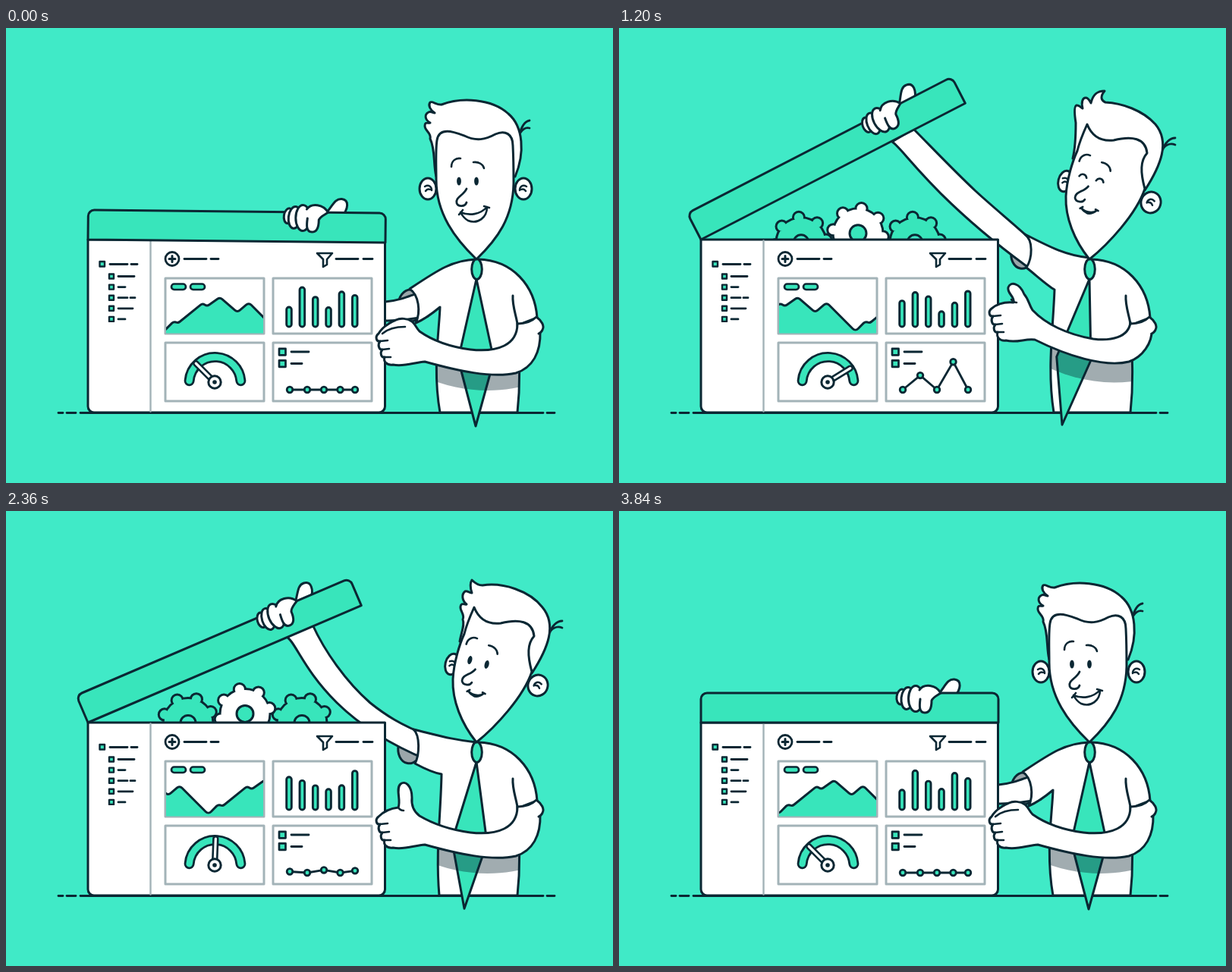
Recreate the animation shown at these times as an HTML page with a canvas. Size 800x600 px, loop 3880 ms.

```html
<!DOCTYPE html>
<html lang="en">
<head>
<meta charset="utf-8">
<title>Dashboard with a lid</title>
<style>
html, body { margin: 0; width: 100%; height: 100%; overflow: hidden; background: #40eac7; }
canvas { display: block; }
</style>
</head>
<body>
<canvas id="stage" width="800" height="600"></canvas>
<script>
const ctx = document.getElementById('stage').getContext('2d');
const LOOP = 3880, TAU = Math.PI * 2;
const BG = '#40eac7', TEAL = '#38e5bb', INK = '#0b2733', WHITE = '#fff', GREY = '#a3b3b8';

// ---------- helpers ----------
const clamp = (v, lo = 0, hi = 1) => Math.min(hi, Math.max(lo, v));
const lerp = (a, b, k) => a + (b - a) * k;
const smooth = x => { x = clamp(x); return x * x * (3 - 2 * x); };
const NUM = /-?\d+(\.\d+)?/g;

// Blend two path strings that share the same commands.
function mix(a, b, k) {
  const to = b.match(NUM);
  let i = 0;
  return a.replace(NUM, n => lerp(+n, +to[i++], k).toFixed(3));
}

// Eased value from a flat list: time, value, time, value...
function track(t, ...keys) {
  if (t <= keys[0]) return keys[1];
  for (let i = 2; i < keys.length; i += 2) {
    if (t <= keys[i]) return lerp(keys[i - 1], keys[i + 1], smooth((t - keys[i - 2]) / (keys[i] - keys[i - 2])));
  }
  return keys[keys.length - 1];
}

// Path for a value between keyed poses.
function pose(keys, v) {
  let i = 0;
  while (i < keys.length - 2 && v > keys[i + 1][0]) i++;
  const [[from, a], [to, b]] = [keys[i], keys[i + 1]];
  return mix(a, b, clamp((v - from) / (to - from)));
}

function paint(path, fill, line = 3, color = INK) {
  if (fill) { ctx.fillStyle = fill; ctx.fill(path); }
  if (line) { ctx.lineWidth = line; ctx.strokeStyle = color; ctx.stroke(path); }
}
const draw = (d, ...style) => paint(new Path2D(d), ...style);
function oval(x, y, rx, ry, fill, line, turn = 0) {
  const p = new Path2D();
  p.ellipse(x, y, rx, ry, turn, 0, TAU);
  paint(p, fill, line);
}
function box(x, y, w, h, r, ...style) {
  const p = new Path2D();
  p.roundRect(x, y, w, h, r);
  paint(p, ...style);
}
const dashes = (y, ...xs) => {
  for (let i = 0; i < xs.length; i += 2) draw(`M${xs[i]} ${y}H${xs[i + 1]}`, null, 2.8);
};
function group(x, y, turn, body) {
  ctx.save();
  ctx.translate(x, y);
  ctx.rotate(turn);
  body();
  ctx.restore();
}

// ---------- poses ----------
const ARM = [ // keyed by lid angle
  [0, 'M415 262 C425 380 460 398 556 380 L556 345 C525 356 515 360 500 361 C465 360 452 320 445 262Z'],
  [1.6, 'M425 262 C430 370 460 382 556 373 L556 345 C535 342 515 343 500 343 C470 340 456 320 449 262Z'],
  [21.1, 'M376 176 C396 182 406 267 555 328 L556 296 C520 282 500 270 480 254 C455 230 426 200 411 163Z'],
  [23.2, 'M368 165 C388 172 402 265 555 328 L556 296 C520 282 500 269 480 253 C448 225 420 185 404 150Z'],
  [27.3, 'M360 150 C376 160 415 227 552 325 L555 290 C520 258 495 238 470 215 C440 187 410 155 388 133Z']
];
const SIDE = ' L674 507 C678 470 677 440 674 392 L700 382 C697 340 668 306 622 305Z';
const TORSO = [
  [0, 'M620 305 C588 306 568 320 532 344 C544 352 547 374 540 389 C552 384 560 378 572 368 C571 400 562 450 572 507' + SIDE],
  [1.6, 'M620 305 C590 304 570 312 531 335 C544 342 547 364 540 380 C552 378 562 372 572 362 C571 400 562 450 572 507' + SIDE],
  [23.2, 'M620 305 C590 302 570 296 537 288 C546 296 545 322 539 333 C552 340 562 345 574 347 C573 400 566 450 571 507' + SIDE],
  [27.3, 'M620 303 C590 300 570 290 535 272 C546 280 545 303 537 316 C552 328 565 340 574 345 C572 400 564 450 573 507' + SIDE]
];

const FINGERS = ' C486 407 488 414 493 413 C489 418 492 425 496 424 C492 429 495 435 499 434 C497 440 502 445 510 444 C525 447 538 441 552 440 C595 452 640 462 672 455 C694 448 705 428 704 400';
const FIST = 'M674 390 C674 418 648 428 612 424 C582 420 562 412 545 400 C541 396 539 390 535 387 C529 383 520 382 514 385 C508 387 506 389 503 391 C498 394 494 398 491 403' + FINGERS;
const THUMB_UP = 'M674 390 C674 418 648 428 612 424 C582 420 562 412 545 402 C537 396 534 388 535 378 C535 362 526 355 520 360 C513 366 521 382 517 391 C508 392 498 396 491 403' + FINGERS;
const RAISED = 'M674 388 C672 408 648 413 625 410 C590 404 562 390 545 372 C540 364 540 358 534 351 C528 336 516 334 513 342 C511 350 522 354 520 362 C508 361 498 364 491 370 C486 374 488 381 493 380 C489 385 492 392 496 391 C492 396 495 402 499 401 C497 408 502 413 510 412 C525 416 535 409 548 411 C590 432 640 448 672 440 C690 434 703 415 702 398';
const CREASE = 'M496 403C504 396 513 394 526 394';
const CREASE_UP = 'M517 391C519 394 521 395 524 395';

const HAIR_FRONT = 'M567 196 C563 180 566 160 559 146 C561 138 552 136 552 129 C552 123 556 126 559 125 C552 121 551 114 557 111 C560 109 562 112 565 112 C559 108 556 102 559 98 C562 96 568 102 574 101 C600 91 640 93 662 113 C682 130 684 165 671 196 L655 190Z';
const HAIR_TURN = 'M598 172 C600 160 605 150 602 143 C605 136 598 132 599 126 C600 120 604 124 607 123 C601 118 600 110 605 106 C608 105 611 108 614 108 C612 102 611 96 614 91 C617 94 621 98 628 98 C655 94 690 105 707 127 C726 150 715 180 693 214 L675 195Z';
const HAIR_FLICK = 'M598 172 C601 160 602 140 602 125 C600 112 600 103 603 102 C607 101 608 105 611 106 C609 98 611 92 615 92 C619 92 620 96 622 99 C624 90 628 83 640 83 C635 89 634 95 641 98 C662 99 690 108 707 127 C726 150 715 180 693 214 L675 195Z';
const FACE_FRONT = 'M567 200 C567 180 566 160 568 148 C571 130 590 137 604 142 C620 150 632 147 645 140 C658 134 668 140 668 155 C669 175 669 190 669 205 C668 250 648 278 620 305 C592 278 567 245 567 200Z';
const FACE_TURN = 'M589 222 C590 200 598 175 604 162 C607 150 612 138 617 127 C623 142 634 150 652 148 C676 142 694 145 696 165 C687 175 687 190 693 212 C682 245 645 285 620 305 C600 280 588 250 589 222Z';
const TUFT_FRONT = 'M677 140 C679 130 684 123 690 122 M678 138 C682 132 686 131 690 132';
const TUFT_TURN = 'M717 160 C719 152 726 145 733 145 M718 158 C722 153 728 152 733 154';
const SMILE = 'M599 243 C611 248 625 246 634 236 C634 250 622 259 609 254 C604 251 601 247 599 243 M597 246 L602 240 M630 235 L637 237';
const GRIN = 'M606 242 C610 246 621 246 626 240 C621 246 617 248 613 246 C609 245 607 244 606 242 M604 243 L607 240 M624 239 L628 240';

// ---------- dashboard ----------
const RIDGE = [[208, 400], [221, 387], [227, 389], [259, 363], [265, 367], [282, 355], [305, 375], [320, 362]];
const BARS = [[358, 9, 0], [348, 7, .5], [358.5, 7, .63], [365, 8, .2], [352, 11, .33], [346.5, 5, .97]]; // middle, swing, phase

function ridge(t) {
  const p = new Path2D(), shift = -150 * t / LOOP;
  p.moveTo(208 + shift - 5, 410);
  for (let n = 0; n < 3; n++) {
    RIDGE.forEach(([x, y], i) => {
      const [nx, ny] = RIDGE[i + 1] || [358, 400];
      p.arcTo(x + 150 * n + shift, y, nx + 150 * n + shift, ny, 5);
    });
  }
  p.lineTo(700, 410);
  ctx.save();
  ctx.beginPath();
  ctx.rect(211, 331, 128, 71.5);
  ctx.clip();
  paint(p, TEAL);
  ctx.restore();
}

function gauge(t) {
  const arc = new Path2D();
  arc.arc(275.5, 468, 34, Math.PI + .08, TAU - .08);
  paint(arc, null, 14);
  paint(arc, null, 8.4, TEAL);
  const swing = clamp(1.45 * Math.cos(TAU * (t / 1940 + .02)), -1, 1);
  group(275, 467, (8.5 - 53.5 * swing) * Math.PI / 180, () => {
    draw('M0 0V-35', null, 8.4);
    draw('M0 0V-35', null, 3.2, WHITE);
  });
  oval(275, 467, 8.2, 8.2, WHITE, 3);
  oval(275, 467, 2.8, 2.8, INK, 0);
}

function lineChart(t) {
  const half = t % 1940, odd = t >= 1940;
  const rise = half < 1250 ? smooth((half - 200) / 1050) : 1 - smooth((half - 1250) / 600);
  const pts = [13, 19, 31, 37, 23].map((h, i) =>
    [[374, 397, 419, 440.5, 460][i], 477 - ((i % 2 === 0) === odd ? h * rise : 0)]);
  draw('M' + pts.join('L'), null, 2.8);
  pts.forEach(([x, y]) => oval(x, y, 3.8, 3.8, TEAL, 2.8));
}

function dashboard(t) {
  box(108, 279, 391.5, 228, [0, 0, 8, 8], WHITE);
  draw('M190.5 280.5V505.5', null, 2.4, GREY);
  box(123.5, 308, 6.5, 6.5, 0, TEAL, 2.4);
  dashes(311.5, 137, 160, 165, 173);
  [[148, 169], [148, 157], [148, 160, 164, 170], [148, 167], [148, 157]].forEach((xs, i) => {
    const y = 327.5 + i * 14.1;
    box(136, y - 3, 6, 6, 0, TEAL, 2.4);
    dashes(y, ...xs);
  });
  oval(219, 304.5, 9, 9, WHITE, 2.8);
  draw('M215 304.5H223M219 300.5V308.5', null, 3);
  dashes(304.5, 235, 264, 270, 280, 435, 464, 471, 483);
  draw('M410 297H430L423 305V312L418 315V305Z', WHITE, 2.6);

  [[210, 330, 73], [352, 330, 73], [210, 415, 77], [352, 415, 77]].forEach(([x, y, h]) =>
    box(x, y, 130, h, 0, null, 3, GREY));
  ridge(t);
  box(218, 337.5, 19, 7.5, 3.7, TEAL, 2.7);
  box(243, 337.5, 19, 7.5, 3.7, TEAL, 2.7);
  BARS.forEach(([mid, swing, phase], i) => {
    const top = mid + swing * Math.cos(TAU * (t / 970 - phase));
    box(369.7 + i * 17.35, top + 1, 6.6, 393 - top, 3.3, TEAL, 2.9);
  });
  gauge(t);
  [427, 442.5].forEach((y, i) => {
    box(360, y - 4.2, 8.5, 8.5, 0, TEAL, 2.7);
    dashes(y, 376, 399 - 9 * i);
  });
  lineChart(t);
}

// ---------- lid, gears, hand ----------
function gear(x, y, turn, fill) {
  for (const [grow, color] of [[1.5, INK], [-1.5, fill]]) {
    ctx.fillStyle = color;
    ctx.beginPath();
    ctx.arc(x, y, 33 + grow, 0, TAU);
    for (let i = 0; i < 8; i++) {
      const a = turn + i * TAU / 8, bx = x + 33 * Math.cos(a), by = y + 33 * Math.sin(a);
      ctx.moveTo(bx, by);
      ctx.arc(bx, by, 7.6 + grow, 0, TAU);
    }
    ctx.fill();
  }
}
function gears(t, angle) {
  const rock = Math.cos(TAU * (t - 1150) / 1940);
  const y = 268.8 + 2 * rock + 46 * (1 - smooth(angle / 16));
  const turn = (-4 + 12 * rock - 90) * Math.PI / 180;
  for (const x of [240, 390]) {
    gear(x, y + 12, turn - .23, TEAL);
    oval(x, y + 12, 10, 10, BG);
  }
  gear(315, y, turn, WHITE);
  oval(315, y, 11, 11, TEAL);
}
function onLid(angle, body) {
  group(108, 279, -angle * Math.PI / 180, body);
}
function lid() {
  box(0, -39, 392, 39, [8, 8, 0, 0], TEAL);
  oval(264, -34, 6, 10, WHITE, 3, .15);
  oval(272, -32, 8, 14.5, WHITE, 3, .1);
  oval(283, -31.5, 9.5, 17, WHITE, 3);
  draw('M288 -43C294 -52 310 -50 316 -39C312 -36 306 -34 304 -29C304 -21 302 -13 295 -13C287 -13 288 -23 289 -31', WHITE);
}
const thumb = () => draw('M312 -36C322 -48 325 -58 334 -57C344 -56 343 -44 334 -34Z', WHITE);

// ---------- man ----------
function body(angle, raise, thumbUp, sway) {
  const torso = new Path2D(pose(TORSO, angle));
  paint(torso, WHITE);
  draw(`M620 331L${596 + .55 * sway} ${437 + .1 * sway}L${619 + sway} ${525 - .05 * Math.abs(sway)}L${643 + .6 * sway} 438Z`, TEAL);
  oval(620.5, 318, 6.8, 13.5, TEAL, 3);

  ctx.save();
  ctx.clip(torso);
  group(567, 447 - 19 * raise, .11 * raise, () =>
    draw('M-17 -17H133V20C83 37 33 34 -17 13Z', 'rgba(10,38,48,.38)', 0));
  ctx.restore();

  draw(mix(mix(FIST, THUMB_UP, thumbUp), RAISED, raise), WHITE);
  group(0, -33 * raise, 0, () => {
    draw(mix(CREASE, CREASE_UP, thumbUp), null, 2.6);
    draw('M493 413L503 412M496 424L505 423M499 434L507 434', null, 2.6);
  });
  draw('M674 390C686 390 694 386 699 381C706 386 710 393 707 398C706 401 704 402 702 403', WHITE);
  draw('M668 353C667 365 672 378 674 390');
}

function ear(x, y, rx, side, turn) {
  group(x, y, turn, () => {
    oval(0, 0, rx, 14, WHITE, 3);
    ctx.scale(side, 1);
    draw('M-4 -3C1 -6 5 -3 5 2M-3 3C-1 0 1 0 3 1', null, 2.5);
  });
}

function head(turn, flick, closed, smile) {
  draw(mix(TUFT_FRONT, TUFT_TURN, turn), null, 2.8);
  ear(lerp(556, 588, turn), lerp(212, 202, turn), lerp(11, 9, turn), 1, .25 * turn);
  ear(lerp(682, 701, turn), lerp(212, 230, turn), lerp(11, 13, turn), -1, .3 * turn);
  draw(mix(mix(HAIR_FRONT, HAIR_TURN, turn), HAIR_FLICK, flick), WHITE);
  draw(mix(FACE_FRONT, FACE_TURN, turn), WHITE);

  group(lerp(608.5, 622.5, turn), lerp(202, 199.5, turn), .26 * turn, () => {
    ctx.translate(-608.5, -202);
    for (const x of [597, 620]) {
      if (closed) draw(`M${x - 5} 202C${x - 3} 197 ${x + 3} 197 ${x + 5} 202`, null, 2.6);
      else oval(x, 202, 2.9, 5.6, INK, 0);
    }
    draw('M587 183C587 175 593 171 599 172M616 177C623 176 629 180 630 185', null, 2.6);
    draw('M607 212C603 221 592 223 594 231C596 236 605 236 607 230', null, 2.8);
    draw(mix(GRIN, SMILE, smile), WHITE, 2.6);
  });
}

// ---------- scene ----------
function frame(now) {
  const t = now % LOOP;
  const angle = track(t, 0, -.6, 300, -.8, 700, 0, 800, 1.6, 1200, 27.3, 1560, 22.6, 1840, 23.2, 2815, 23.2, 3400, 0, 3840, 0, 3880, -.6);
  const turn = track(t, 700, 0, 800, .03, 1180, 1, 1400, 1, 1840, .65, 1920, .65, 2300, 1, 2930, 1, 3440, 0);
  const flick = track(t, 900, 0, 1200, 1, 1560, 0);
  const raise = track(t, 850, 0, 1200, 1, 1600, 0);
  const thumbUp = track(t, 850, 0, 1200, 1, 3000, 1, 3400, 0);
  const sway = track(t, 700, 0, 800, -1, 1200, -35, 1560, 8, 1880, 2, 2360, -15, 2920, 0);
  const smile = track(t, 850, 1, 1050, 0, 2500, 0, 2900, .5, 3000, .5, 3300, 1);

  ctx.lineJoin = ctx.lineCap = 'round';
  ctx.fillStyle = BG;
  ctx.fillRect(0, 0, 800, 600);
  dashes(507.5, 69, 75, 80, 92, 98, 708, 713, 723);

  const open = clamp(angle / 23.2);
  oval(533, lerp(366, 312, open) - 3.8 * Math.max(0, angle - 23.2), 16, 21, '#9ba6aa', 3, .2 * open);
  draw(pose(ARM, angle), WHITE);
  onLid(angle, thumb);
  ctx.save();
  ctx.beginPath();
  ctx.rect(0, 0, 800, 280);
  ctx.clip();
  gears(t, angle);
  ctx.restore();
  dashboard(t);
  onLid(angle, lid);
  body(angle, raise, thumbUp, sway);
  head(turn, flick, t > 980 && t < 2120, smile);
  requestAnimationFrame(frame);
}
requestAnimationFrame(frame);
</script>
</body>
</html>
```
